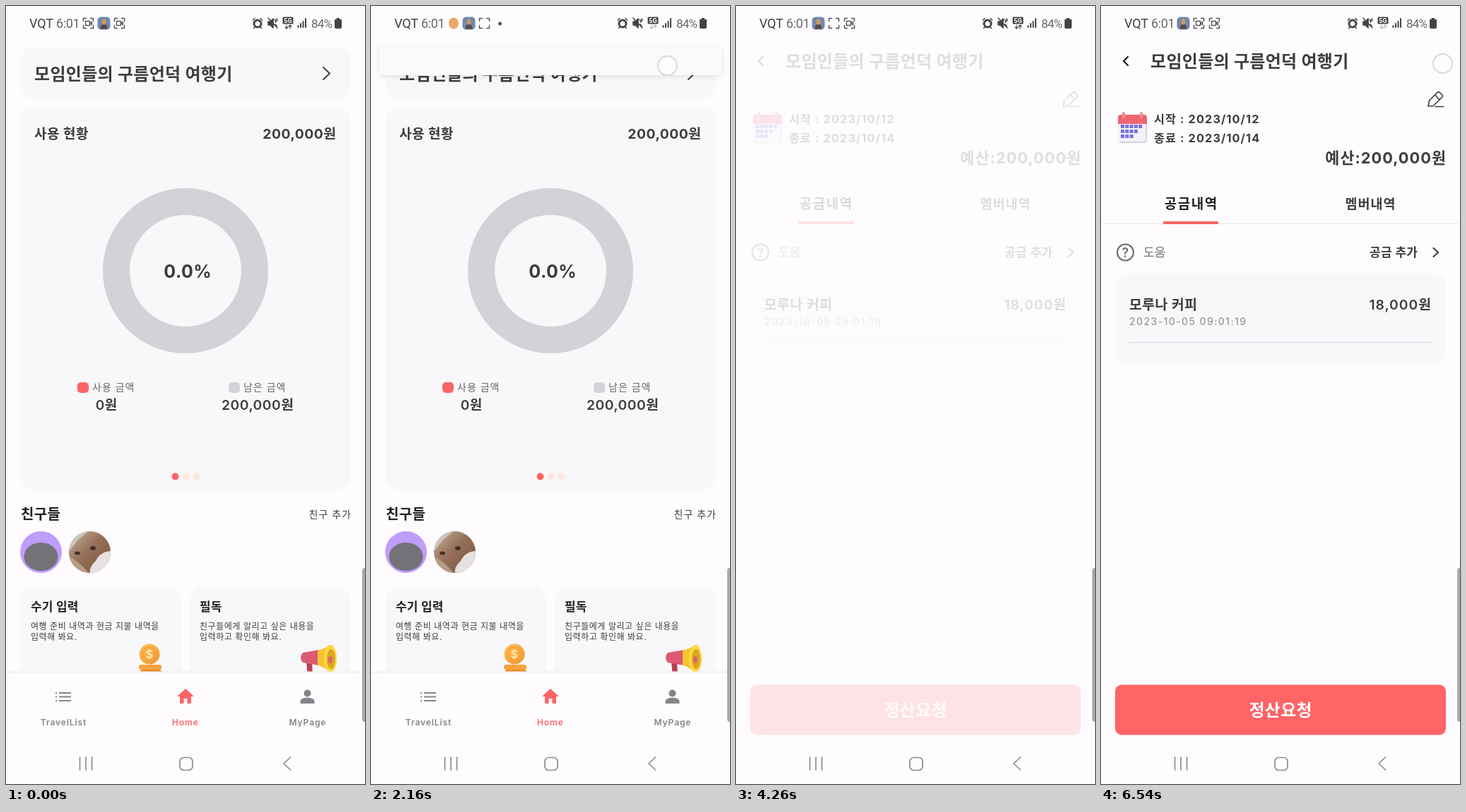
An HTML page for the animation above (6.6 s loop, 508 by 1102 pixels).

```html
<!DOCTYPE html>
<html lang="ko">
<head>
<meta charset="utf-8">
<style>
html, body { margin: 0; width: 100%; height: 100%; overflow: hidden; background: #fefcff; }
svg { position: absolute; left: 0; top: 0; width: 508px; height: 1102px; }
text { font-family: Inter, "Noto Sans CJK KR", "Noto Sans CJK", sans-serif; white-space: pre; }
#status text { font-family: Roboto, sans-serif; }
.line { fill: none; stroke-linecap: round; stroke-linejoin: round; }
#panel, #glow { position: absolute; box-sizing: border-box; }
#panel { background: #faf9fc; box-shadow: 0 1px 8px #0000001c; }
#face { position: absolute; left: 10px; top: 13px; width: 15px; height: 18px; border-radius: 8px; background: #eda768; }
#glow { left: 0; top: 0; width: 508px; height: 1102px; border-radius: 48px;
  box-shadow: inset 0 0 24px 7px #c3e6eb, inset 0 0 3px 1px #b5d9df, 0 0 0 60px #000; }
#stage { position: absolute; left: 0; top: 0; width: 508px; height: 1102px; overflow: hidden; }
</style>
</head>
<body>
<div id="stage">
<svg viewBox="0 0 508 1102">
  <defs>
    <clipPath id="catClip"><circle cx="118.500" cy="773.500" r="29.500"/></clipPath>
    <clipPath id="scroll"><path d="M0 700H508V943H0Z"/></clipPath>
    <linearGradient id="fur" x2="1" y2="1"><stop stop-color="#c9b5a3"/><stop offset=".45" stop-color="#987159"/><stop offset="1" stop-color="#70503f"/></linearGradient>
    <linearGradient id="gold" x2="1" y2="1"><stop stop-color="#ffc35b"/><stop offset="1" stop-color="#f1922c"/></linearGradient>
    <g id="frame" class="line" stroke="#555357" stroke-width="1.5">
      <path d="M-7 -3V-7H-3M3 -7H7V-3M7 3V7H3M-3 7H-7V3"/>
    </g>
    <g id="camera" class="line" stroke="#555357" stroke-width="1.400"><path d="M-4 -3H2V3H-4ZM2 0L5 -2V2Z"/></g>
    <g id="app"><rect x="-9" y="-9" width="18" height="18" rx="5" fill="#7187b4"/><path d="M-5 8Q-5 1 0 1T5 8Z" fill="#594c48"/><ellipse cy="-2" rx="3" ry="4" fill="#cf9951"/></g>
  </defs>

  <g id="home">
    <g fill="#f8f7fa">
      <rect x="20" y="58" width="468" height="74" rx="20"/>
      <rect x="20" y="143" width="468" height="543" rx="19"/>
    </g>
    <path class="line" d="M449 87L458 95.500L449 104" stroke="#3f3c40" stroke-width="2"/>
    <circle cx="254" cy="375" r="98" fill="none" stroke="#d2d3d7" stroke-width="38"/>
    <rect x="101" y="533" width="16" height="15" rx="5" fill="#fd6466"/>
    <rect x="315" y="533" width="16" height="15" rx="5" fill="#d2d3d7"/>
    <circle cx="239.500" cy="666.500" r="5" fill="#fd6466"/>
    <g fill="#fee6df"><circle cx="254.500" cy="666.500" r="5"/><circle cx="269.500" cy="666.500" r="5"/></g>
    <circle cx="49.500" cy="773.500" r="29.500" fill="#c09cfb"/>
    <ellipse cx="49.500" cy="780" rx="24" ry="20" fill="#737277"/>
    <g clip-path="url(#catClip)">
      <path d="M88 743H149V804H88Z" fill="url(#fur)"/>
      <path d="M88 743H118L102 756L88 774Z" fill="#cbc6bd"/>
      <path d="M149 772Q133 773 127 786Q117 795 119 804H149Z" fill="#e7e2df"/>
      <path d="M88 779Q103 786 118 804H88Z" fill="#b79c84"/>
      <ellipse cx="123" cy="768" rx="4" ry="3" fill="#41302b"/><ellipse cx="101" cy="775" rx="4" ry="2.500" fill="#41302b"/>
    </g>
    <g clip-path="url(#scroll)">
      <rect x="20" y="823" width="228" height="150" rx="19" fill="#f8f7fa"/>
      <rect x="260" y="823" width="228" height="150" rx="19" fill="#f8f7fa"/>
      <rect x="188" y="933" width="32" height="7" rx="3" fill="#f5a33b"/>
      <rect x="190" y="940" width="30" height="8" rx="3" fill="#e88a2b"/>
      <circle cx="203" cy="918" r="14.500" fill="url(#gold)"/>
      <circle cx="203" cy="918" r="10" fill="none" stroke="#f0a23d" stroke-width="1.500"/>
      <path d="M425 930H433L434 948H427Z" fill="#b93f59"/>
      <path d="M420 916L443 912V934L420 930Q414 923 420 916Z" fill="#dc5a72"/>
      <path d="M441 913L460 906V943L441 933Z" fill="#f6c52d"/>
      <ellipse cx="459" cy="924.500" rx="9" ry="19.500" fill="#fbd941"/>
      <ellipse cx="460" cy="925" rx="6" ry="14" fill="#dda61e"/>
      <ellipse cx="459" cy="926" rx="3" ry="5" fill="#d6627a"/>
    </g>
    <path d="M0 943.500H508" stroke="#f1eff2" stroke-width="2"/>
    <path d="M75 973H92M75 978.500H92M75 984H92M70 973H72M70 978.500H72M70 984H72" stroke="#858387" stroke-width="2.200"/>
    <path d="M254 967L242 978H246V988H251.500V981H256.500V988H262V978H266Z" fill="#fd6466"/>
    <g fill="#858387"><circle cx="426.500" cy="973.500" r="5"/><path d="M416.500 988V985C416.500 978 436.500 978 436.500 985V988Z"/></g>
  </g>

  <g id="detail">
    <path class="line" d="M38 72L32 78L38 84" stroke="#222024" stroke-width="2.300"/>
    <g class="line" stroke="#3f3c40" stroke-width="1.600">
      <path d="M463 142L464.500 134L476 122.500Q478 121 480 123L483 126Q484 128 482.500 129.500L470 141.500ZM473 126L479 133M473 142.500H485"/>
    </g>
    <rect x="25" y="156" width="40" height="38" rx="4" fill="#d6d3df"/>
    <rect x="24" y="155" width="39" height="37" rx="4" fill="#f4f2f8"/>
    <path d="M24 167V158Q24 154 28 154H61Q65 154 65 158V167Z" fill="#ee6570"/>
    <path class="line" d="M32 152V158M57 152V158" stroke="#f38a91" stroke-width="4"/>
    <path d="M28 170.500H59M28 177.500H53M28 184.500H47" stroke="#7a72dd" stroke-width="5" stroke-dasharray="5 1.300"/>
    <path d="M0 308.500H508" stroke="#e8e6ea"/>
    <rect x="88" y="305" width="78" height="4" rx="1" fill="#fd6466"/>
    <circle cx="34.500" cy="349" r="11.500" fill="none" stroke="#737175" stroke-width="2.200"/>
    <path class="line" d="M470.500 343L477 349L470.500 355" stroke="#3f3c40" stroke-width="2.200"/>
    <rect x="20" y="379" width="468" height="128" rx="17" fill="#f8f7fa"/>
    <path d="M40 476.500H469" stroke="#e1dfe3" stroke-width="1.500"/>
    <rect x="20" y="961.500" width="468" height="71" rx="9" fill="#ff6467"/>
  </g>

  <g id="status">
    <g id="quiet">
      <use href="#app" class="app" y="24.500"/>
      <g class="blinker"><use href="#frame"/><use href="#camera" id="blink"/></g>
      <g transform="translate(160.500 24.500)"><use href="#frame"/><use href="#camera"/></g>
    </g>
    <g id="alert">
      <ellipse cx="117" cy="24.500" rx="7" ry="8" fill="#eda768"/>
      <use href="#app" x="138.500" y="24.500"/>
      <use href="#frame" x="160.500" y="24.500"/>
      <circle cx="182.500" cy="25" r="2.500" fill="#555357"/>
    </g>
    <g class="line" stroke="#454347" stroke-width="1.600">
      <circle cx="356" cy="25" r="5" stroke-width="3"/><path d="M349.500 20L352 17.500M360 17.500L362.500 20M352 30L350.500 31.500M360 30L361.500 31.500"/>
      <path d="M371 22H374L378 18V31L374 27H371Z" fill="#454347"/><path d="M371 17L384 31M380 19L382 21L381 23M383 18L384 20L382 22M381 26L383 28"/>
      <path d="M413.500 28V30M417 25V30M420.500 22V30M424 18V30" stroke-width="2"/>
    </g>
    <rect x="391.500" y="15.500" width="15" height="10" rx="1.500" fill="#454347"/>
    <path id="arrows" class="line" d="M397 27V32L395 30M397 32L399 30M402 32V27L400 29M402 27L404 29" stroke="#454347" stroke-width="1.200"/>
    <path d="M467.500 17H472V19H475V30Q475 32 473 32H467Q465 32 465 30V19H467.500Z" fill="#454347"/>
  </g>

  <g class="line" stroke="#8d8b8f" stroke-width="1.700">
    <path d="M104.500 1064V1082M113 1064V1082M121.500 1064V1082M402.500 1064L393 1073L402.500 1082"/>
    <rect x="246" y="1064.500" width="18" height="18" rx="5.500"/>
  </g>
  <path d="M508 796Q504 796 504 800V1010Q504 1014 508 1014Z" fill="#aaa8ab"/>
</svg>
<div id="panel"><div id="face"></div></div>
<div id="glow"></div>
<svg viewBox="0 0 508 1102"><circle id="touch" r="13.500" fill="#fff" fill-opacity=".65" stroke="#dad8e0" stroke-width="2"/></svg>
</div>

<script>
const $ = id => document.getElementById(id);
const DARK = '#3f3c40', INK = '#222024', GREY = '#69666b';
const TITLE = '모임인들의 구름언덕 여행기';

// y is the visual middle of the line
function label(parent, str, x, y, size, weight, fill, spacing = 0, anchor = 'start') {
  const el = document.createElementNS('http://www.w3.org/2000/svg', 'text');
  const shift = { start: 0, middle: spacing / 2, end: spacing }[anchor];
  const attrs = { x: x + shift, y: y + size * .365, 'font-size': size, 'font-weight': weight,
    fill, 'letter-spacing': spacing, 'text-anchor': anchor };
  for (const k in attrs) el.setAttribute(k, attrs[k]);
  el.textContent = str;
  $(parent).append(el);
}
const home = (...a) => label('home', ...a);
const detail = (...a) => label('detail', ...a);
const status = (...a) => label('status', ...a);

home(TITLE, 40, 96, 24, 700, DARK, .3);
home('사용 현황', 40, 181, 19, 700, DARK, .5);
home('200,000원', 467, 181, 19.3, 700, DARK, .5, 'end');
home('0.0%', 257, 376, 25, 700, DARK, .5, 'middle');
home('사용 금액', 122, 540, 14, 400, GREY, 1);
home('남은 금액', 336, 540, 14, 400, GREY, 1);
home('0원', 142, 565, 19, 600, DARK, .5, 'middle');
home('200,000원', 356, 565, 19.3, 600, DARK, .5, 'middle');
home('친구들', 21, 720, 20, 700, INK, .3);
home('친구 추가', 488, 720, 14, 400, DARK, 1, 'end');
home('수기 입력', 35, 851, 17, 700, INK, .2);
home('여행 준비 내역과 현금 지물 내역을', 35, 879, 12, 400, DARK, .55);
home('입력해 봐요.', 35, 894, 12, 400, DARK, .55);
home('필독', 274, 851, 17, 700, INK, .2);
home('친구들에게 알리고 싶은 내용을', 274, 879, 12, 400, DARK, .55);
home('입력하고 확인해 봐요.', 274, 894, 12, 400, DARK, .55);
home('$', 203, 918, 16, 600, '#fff0b8', 0, 'middle');
home('TravelList', 81, 1015, 12, 600, '#858387', .9, 'middle');
home('Home', 253.5, 1015, 12, 600, '#fd6466', .9, 'middle');
home('MyPage', 426.5, 1015, 12, 600, '#858387', .9, 'middle');

detail(TITLE, 70, 78, 24, 700, DARK, .3);
detail('시작 : 2023/10/12', 75, 160, 16.3, 700, DARK, 1.1);
detail('종료 : 2023/10/14', 75, 187, 16.3, 700, DARK, 1.1);
detail('예산:200,000원', 488, 215, 21.8, 700, DARK, 1, 'end');
detail('공금내역', 127, 280, 19, 700, INK, 1.6, 'middle');
detail('멤버내역', 381, 280, 18.5, 600, DARK, 1, 'middle');
detail('?', 34.5, 349, 18, 600, '#737175', 0, 'middle');
detail('도움', 60, 349, 17, 500, '#737175');
detail('공금 추가', 448, 349, 17, 600, DARK, .3, 'end');
detail('모루나 커피', 40, 423, 19.3, 600, DARK, .5);
detail('18,000원', 467, 423, 19.3, 600, DARK, 1, 'end');
detail('2023-10-05 09:01:19', 40, 447, 14, 500, '#99979b', 1.4);
detail('정산요청', 254, 997, 24, 700, '#fff', .3, 'middle');

status('VQT', 33, 24.5, 18, 400, DARK);
status('6:01', 71, 24.5, 18, 400, GREY, -.4);
status('84%', 432, 24.5, 17, 400, GREY, -.8);
status('5G', 399, 20.8, 9, 700, '#fff', 0, 'middle');

const ramp = (t, a, b) => Math.min(1, Math.max(0, (t - a) / (b - a)));
const mix = (a, b, p) => a + (b - a) * p;
const within = (t, ...spans) => spans.some(([a, b]) => t >= a && t < b);
const show = (id, v) => $(id).setAttribute('opacity', +v);

function draw() {
  const t = performance.now() % 6600;

  show('home', 1 - ramp(t, 4080, 4230));
  show('detail', ramp(t, 4200, 4590));

  const alert = within(t, [780, 2280]);
  show('alert', alert);
  show('quiet', !alert);
  const early = t < 780;
  document.querySelector('.app').setAttribute('x', early ? 138.5 : 116.5);
  document.querySelector('.blinker').setAttribute('transform', `translate(${early ? 116.5 : 138.5} 24.5)`);
  show('blink', !within(t, [180, 480], [4140, 4980], [5460, 5940]));
  show('arrows', within(t, [2100, 2340], [6420, 6600]) ? .35 : 1);

  $('glow').style.opacity = ramp(t, 780, 1080) * (1 - ramp(t, 1680, 2040));

  // small pill widens into a banner, then leaves upwards
  const grow = 1 - (1 - ramp(t, 1590, 1950)) ** 3;
  const leave = ramp(t, 2190, 2370);
  Object.assign($('panel').style, {
    left: mix(191, 12, grow) + 'px', top: mix(55, 58, grow) - 50 * leave + 'px',
    width: mix(129, 484, grow) + 'px', height: mix(50, 40, grow) + 'px',
    borderRadius: mix(20, 2, grow) + 'px',
    boxShadow: grow ? '' : 'none',
    opacity: ramp(t, 1320, 1500) * mix(.8, 1, grow) * (1 - leave)
  });
  $('face').style.opacity = 1 - ramp(t, 1620, 1860);

  const late = t > 4000;
  $('touch').setAttribute('cx', late ? 483.5 : 419.5);
  $('touch').setAttribute('cy', late ? 81.5 : 84.5);
  show('touch', late ? ramp(t, 5910, 6060) : ramp(t, 2040, 2130) * (1 - ramp(t, 2220, 2340)));

  requestAnimationFrame(draw);
}
draw();
</script>
</body>
</html>
```
